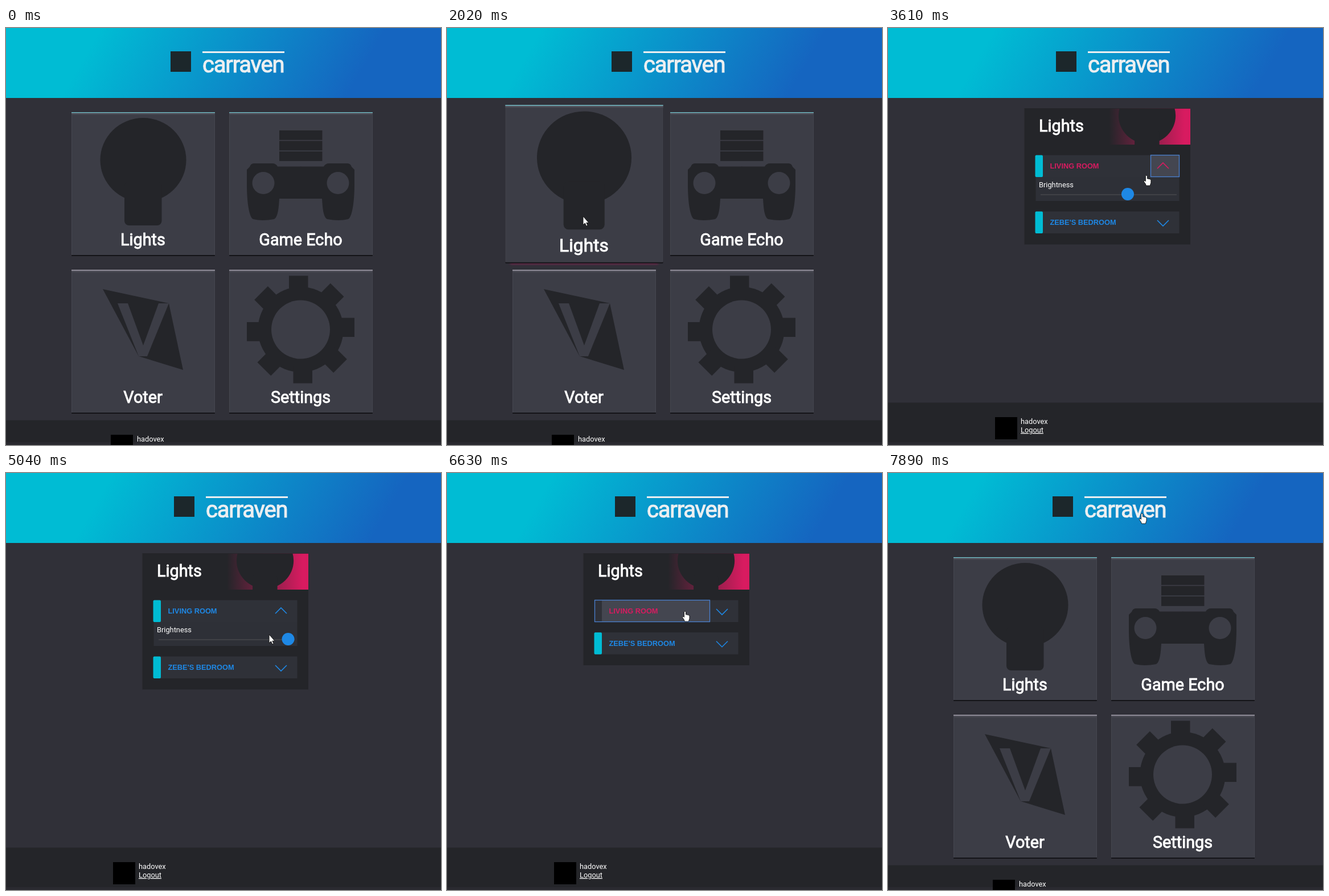
Write an HTML page that moves like this. It is 764 px wide and 733 px high and loops after 8 s.

```html
<!DOCTYPE html>
<html lang="en">
<head>
<meta charset="utf-8">
<title>Home control</title>
<style>
  html, body { margin: 0; width: 100%; height: 100%; overflow: hidden; background: #303038; }
  svg { display: block; width: 764px; height: 733px; }
  text { font: 12.8px Roboto, sans-serif; fill: #fff; }
  .title { font-size: 28.8px; stroke: #fff; stroke-width: .9px; }
  .brand { font-size: 40px; letter-spacing: -.03em; fill: #eceff1; stroke: #eceff1; stroke-width: 1.1px; }
  .room { font: bold 12.8px "Liberation Sans", Arial, sans-serif; }
  .link { text-decoration: underline; }
  .icon { fill: #242529; }
  .hole { fill: #3c3d46; }
  .chevron { fill: none; stroke-width: 1.6px; }
</style>
</head>
<body>
<svg id="stage" viewBox="0 0 764 733"></svg>
<script>
const CYAN = '#00bcd4', BLUE = '#1e88e5', PINK = '#d81b60', ROW = '#2f3138', LIT = '#444650';
const LOOP = 8000, OPEN_LIGHTS = 2250, OPEN_HOME = 7820, EXPAND = 3210, COLLAPSE = 5590;

const rect = (x, y, w, h, fill, more = '') =>
  `<rect x="${x}" y="${y}" width="${w}" height="${h}" fill="${fill}" ${more}/>`;
const text = (x, y, cls, label, more = '') => `<text x="${x}" y="${y}" class="${cls}" ${more}>${label}</text>`;

const header = (id, x, [x1, y1, x2, y2]) => `
  <linearGradient id="${id}" gradientUnits="userSpaceOnUse" x1="${x1}" y1="${y1}" x2="${x2}" y2="${y2}">
    <stop stop-color="${CYAN}"/><stop offset="1" stop-color="#1565c0"/>
  </linearGradient>
  ${rect(0, 0, 764, 123, `url(#${id})`)}
  ${rect(x, 41, 36, 36, '#1c272b')}
  ${rect(x + 56, 41, 144, 3, '#eceff1')}
  ${text(x + 56, 78, 'brand', 'carraven')}`;

const footer = (x, y) => rect(0, y, 764, 733 - y, '#242529') + rect(0, 728, 764, 5, '#2a2a30') +
  rect(x, y + 25.5, 39, 39, '#000');

const bulb = `<g class="icon"><ellipse cx="241" cy="232" rx="75.5" ry="74"/>
  <rect x="208" y="270" width="65.5" height="77" rx="8"/></g>`;

const padHalf = `<path class="icon" d="M423 249L428 244Q430 238 435 238H468Q474 238 477 243.5H518V300H480
  C479 315 478 332 471 336Q450 340 434 336C426 332 423 300 423 275Z"/><circle class="hole" cx="452" cy="272.5" r="19.5"/>`;
const gamepad = [180, 198.5, 217].map(y => rect(480, y, 75.5, 16.8, '#242529')).join('') +
  padHalf + `<g transform="matrix(-1 0 0 1 1035 0)">${padHalf}</g>`;

const ballot = `<path class="icon" d="M170 459L286 484L311 601L233 577Z"/>
  <path class="hole" d="M196 484H214L241 558L268 484H286L248 577H233Z"/>`;

const teeth = Array.from({ length: 8 }, (_, i) =>
  `<rect x="-20.5" y="-94.5" width="33.5" height="30" transform="rotate(${i * 45})"/>`).join('');
const gear = `<g class="icon" transform="translate(517.5 530)"><circle r="75"/>${teeth}<circle class="hole" r="51.5"/></g>`;

const tile = (id, x, y, label, icon, edge) => `<g id="${id}">
  ${rect(x + 8, y + 245, 236, 9, '#a01f58', 'class="glow" opacity="0" filter="url(#soft)"')}
  ${rect(x, y + 1, 252, 252, '#141418', 'rx="1"')}
  ${rect(x, y, 252, 251, '#45464f')}
  ${rect(x + 1, y, 250, 251, '#3c3d46')}
  ${rect(x, y, 252, 5, 'url(#sheen)')}
  ${rect(x, y, 252, 1.2, edge)}
  ${icon}
  ${text(x + 125.5, y + 234, 'title', label, 'text-anchor="middle"')}</g>`;

const chevron = id => `<path id="${id}" class="chevron" stroke="${BLUE}" d="M473 239L483 249L493 239"/>`;
const strip = id => rect(258.5, 223.5, 13.5, 38.5, CYAN, `id="${id}" rx="2"`);

document.getElementById('stage').innerHTML = `
  <defs>
    <filter id="soft" x="-10%" y="-200%" width="120%" height="500%"><feGaussianBlur stdDeviation="2"/></filter>
    <linearGradient id="sheen" x2="0" y2="1"><stop stop-color="#66656f"/><stop offset="1" stop-color="#3c3d46"/></linearGradient>
    <linearGradient id="blush"><stop stop-color="${PINK}" stop-opacity="0"/><stop offset=".93" stop-color="${PINK}"/></linearGradient>
    <clipPath id="banner"><rect x="240" y="141.500" width="291" height="63.500"/></clipPath>
  </defs>
  ${rect(0, 0, 764, 733, '#303038')}
  <g id="home">
    ${header('homeSky', 289, [194, -47, 570, 170])}
    ${footer(184, 689.5)}
    ${text(230, 726.5, '', 'hadovex')}
    ${tile('echo', 392, 148, 'Game Echo', gamepad, '#6fc3cc')}
    ${tile('voter', 115, 425, 'Voter', ballot, '#b0abb8')}
    ${tile('settings', 392, 425, 'Settings', gear, '#b0abb8')}
    ${tile('bulbTile', 115, 148, 'Lights', bulb, '#6fc3cc')}
  </g>
  <g id="lights">
    ${header('lightsSky', 295, [210, -38, 601, 188])}
    ${footer(188, 658.5)}
    ${text(233, 696, '', 'hadovex')}
    ${text(233, 711, 'link', 'Logout')}
    ${rect(239.5, 141, 291.5, 197, '#242529', 'id="card"')}
    <g clip-path="url(#banner)">
      ${rect(388, 141.5, 143, 63.5, 'url(#blush)')}
      <g transform="translate(295) scale(.664)">${bulb}</g>
    </g>
    ${text(265, 181.5, 'title', 'Lights')}
    <g id="panel">
      ${rect(259.5, 262, 252, 42, '#2e3037')}
      ${text(265, 279.5, '', 'Brightness')}
      ${rect(268, 292, 239, 2, '#404146')}
      <circle id="thumb" cy="292" r="11" fill="${BLUE}"/>
    </g>
    ${rect(259.5, 223.5, 252, 38.5, ROW)}
    ${rect(272, 223.5, 189, 38.5, LIT, 'id="mainFill"')}
    ${rect(461, 223.5, 50.5, 38.5, LIT, 'id="sideFill"')}
    ${strip('livingStrip')}
    ${rect(0, 223.5, 0, 38, 'none', 'id="focus" stroke="#4a80cf" stroke-width="1.3"')}
    ${text(284.5, 247.2, 'room', 'LIVING ROOM', 'id="living"')}
    ${chevron('livingArrow')}
    <g id="bedroom">
      ${rect(259.5, 223.5, 252, 38.5, ROW)}
      ${strip('bedStrip')}
      ${text(284.5, 247.2, 'room', "ZEBE'S BEDROOM", `style="fill:${BLUE}"`)}
      ${chevron('bedArrow')}
    </g>
  </g>
  <g id="cursor" fill="#fff" stroke="#111" stroke-width=".9" stroke-linejoin="round">
    <path id="arrow" d="M0 0V15L3.400 12L5.700 17.200L8 16.200L5.800 11.300H10Z"/>
    <path id="hand" d="M-1.500 1Q0 -1 1.500 1V6Q3 5 4 6.500Q5.500 5.500 6.300 7Q8 6.500 8 8.500V13Q7 15 6.500 18
      H-.5Q-1 15 -4.500 11Q-5 8.500 -2.500 9.500L-1.500 10.500Z"/>
  </g>`;

const el = id => document.getElementById(id);
const set = (id, values) => { for (const k in values) el(id).setAttribute(k, values[k]); };
const show = (id, on) => { el(id).style.display = on ? '' : 'none'; };
const within = (t, a, b) => t >= a && t < b;
const ramp = (t, a, b) => { const p = Math.min(1, Math.max(0, (t - a) / (b - a))); return p * p * (3 - 2 * p); };

// time, x, y of the pointer tip
const pointerPath = [
  [370, 462, 709], [450, 395, 560], [530, 300, 420], [610, 239, 331], [2250, 239, 331],
  [2650, 345, 262], [2810, 440, 241], [2890, 501, 244], [3050, 484, 243], [3450, 484, 243],
  [3610, 454, 259], [3930, 421, 290], [4010, 421, 290], [4330, 500, 300], [4570, 553, 340],
  [4880, 553, 340], [5040, 462, 284], [5360, 484, 243], [6160, 484, 243], [6240, 418, 243],
  [6790, 418, 243], [7190, 446, 71], [8000, 446, 71]
];

function pointerAt(t) {
  const i = Math.max(1, pointerPath.findIndex(k => k[0] > t));
  const [t0, x0, y0] = pointerPath[i - 1], [t1, x1, y1] = pointerPath[i];
  const p = Math.max(0, (t - t0) / (t1 - t0));
  return [x0 + (x1 - x0) * p, y0 + (y1 - y0) * p];
}

function rowHover(t) {
  const [x, y] = pointerAt(t);
  if (!within(y, 223, 262) || !within(x, 259, 512)) return '';
  return x < 461 ? 'main' : 'side';
}

function hoverTile(id, cx, cy, amount) {
  const s = 1 + amount * .1;
  set(id, { transform: `translate(${cx} ${cy}) scale(${s}) translate(${-cx} ${-cy})` });
  el(id).querySelector('.glow').setAttribute('opacity', amount * .7);
}

function drawHome(t) {
  const first = t < OPEN_LIGHTS;
  hoverTile('bulbTile', 241, 274, first ? ramp(t, 490, 610) : 0);
  hoverTile('settings', 518, 551, first ? ramp(t, 370, 450) - ramp(t, 490, 610) : 0);
}

function drawLights(t) {
  const open = within(t, EXPAND, COLLAPSE);
  const hover = rowHover(t), lagged = rowHover(t - 80);
  const sideFocus = within(t, 3130, 4010) || within(t, 5520, 6220);
  const mainFocus = t >= 6220;

  show('panel', open);
  set('card', { height: open ? 239.5 : 197 });
  set('bedroom', { transform: `translate(0 ${open ? 99 : 56.7})` });
  set('thumb', { cx: t < 4010 ? 421 : t > 4570 ? 495.5 : Math.min(495.5, pointerAt(t)[0]) });

  show('mainFill', lagged === 'main');
  show('sideFill', lagged === 'side');
  el('living').style.fill = hover === 'main' ? PINK : BLUE;
  set('livingArrow', {
    stroke: sideFocus || lagged === 'side' ? PINK : BLUE,
    d: open ? 'M473 247L483 237L493 247' : 'M473 239L483 249L493 239'
  });
  set('livingStrip', { opacity: 1 - ramp(t, 6310, 6600) });

  show('focus', sideFocus || mainFocus);
  set('focus', mainFocus ? { x: 259.5, width: 202 } : { x: 461.5, width: 50 });
}

function drawPointer(t, onHome) {
  const [x, y] = pointerAt(t);
  const hand = onHome ? !within(t, 1980, OPEN_LIGHTS) && (t > OPEN_HOME || y < 689)
                      : rowHover(t) !== '' || y < 100;
  show('cursor', t >= 370);
  show('hand', hand);
  show('arrow', !hand);
  set('cursor', { transform: `translate(${x} ${y})` });
}

function draw(now) {
  const t = now % LOOP;
  const onHome = !within(t, OPEN_LIGHTS, OPEN_HOME);
  show('home', onHome);
  show('lights', !onHome);
  if (onHome) drawHome(t); else drawLights(t);
  drawPointer(t, onHome);
}

const start = performance.now();
function tick() {
  draw(performance.now() - start);
  requestAnimationFrame(tick);
}
tick();
</script>
</body>
</html>
```
